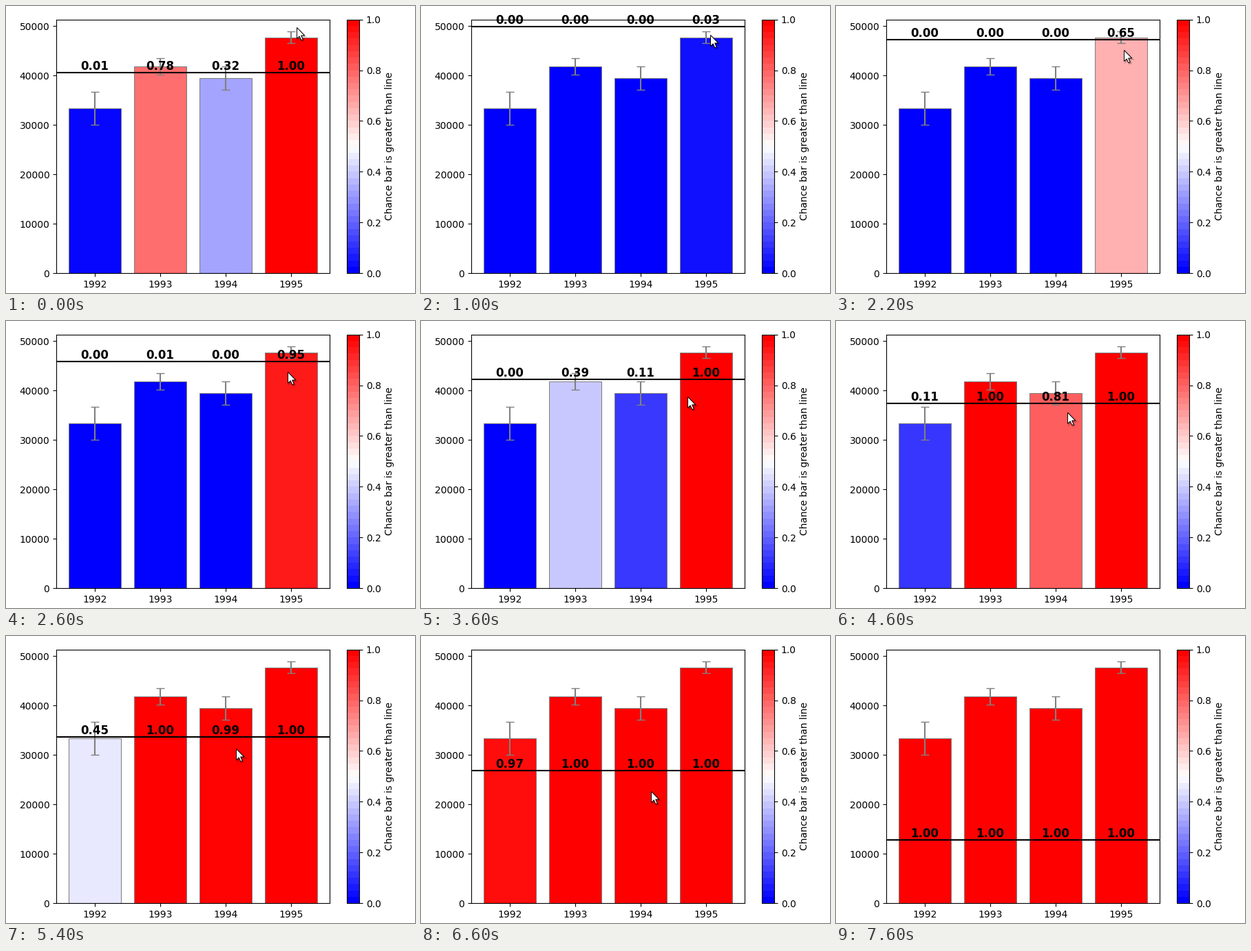
A matplotlib script for the animation above (8400 ms loop, 594x418 px).

```python
import math

import numpy as np
import matplotlib.pyplot as plt
from matplotlib.animation import FuncAnimation
from matplotlib.cm import ScalarMappable
from matplotlib.colors import Normalize
from matplotlib.patches import Polygon

W, H, DPI = 594, 418, 100
LEFT, BOTTOM, WIDTH, HEIGHT = 73, 28.8, 396.8, 369.6
STEP, FRAMES = 200, 42       # ms per step, steps per loop
PAUSES = (10, 17, 22, 28)    # steps in which the pointer rests
EXIT = 7600                  # ms at which the pointer has left
LAG = 600                    # ms by which the line trails the pointer

# Yearly samples, reduced to mean and standard error
np.random.seed(12345)
YEARS = ["1992", "1993", "1994", "1995"]
SPREAD = [(32000, 200000), (43000, 100000), (43500, 140000), (48000, 70000)]
samples = [np.random.normal(mu, sd, 3650) for mu, sd in SPREAD]
means = np.array([s.mean() for s in samples])
errors = np.array([s.std(ddof=1) / math.sqrt(len(s)) for s in samples])
top = 1.05 * (means + errors).max()

# Pointer path as (ms, pixel) points, measured from the top left
PATH_X = [(0, 422), (2200, 418), (3600, 387), (4600, 336), (5400, 334)]
PATH_Y = [(-600, 97.1), (0, 31), (600, 30), (1200, 47.5), (1600, 48.8),
          (2200, 64), (3000, 84.6), (3600, 110), (4000, 119.8), (4600, 133),
          (4800, 146.6), (5400, 164), (6000, 196), (6600, 226), (7000, 297),
          (7400, 384)]
ARROW = np.array([(0.5, 0.5), (0.5, 16.5), (4.2, 13), (6.8, 18.8),
                  (9.2, 17.8), (6.7, 12), (11.7, 12)])


def along(path, t):
    return np.interp(t, *zip(*path))


def to_value(y):
    """Chart value at a pixel row."""
    return (H - BOTTOM - y) / HEIGHT * top


def chance(mean, err, value):
    """Probability that the true mean lies above value."""
    return 0.5 * (1 + math.erf((mean - value) / (err * math.sqrt(2))))


def place(left, bottom, width, height):
    return fig.add_axes([left / W, bottom / H, width / W, height / H])


fig = plt.figure(figsize=(W / DPI, H / DPI), dpi=DPI, facecolor="white")
cmap = plt.get_cmap("bwr")

ax = place(LEFT, BOTTOM, WIDTH, HEIGHT)
pos = np.arange(len(YEARS))
bars = ax.bar(pos, means, 0.8, yerr=errors, edgecolor="gray", lw=0.75,
              ecolor="gray", capsize=4.4)
ax.set_xticks(pos, YEARS)
ax.set_xlim(-0.59, 3.59)
ax.set_ylim(0, top)
line = ax.axhline(0, color="black", lw=1.5)
labels = [ax.text(x, 0, "", ha="center", va="bottom", fontsize=12,
                  fontweight="bold") for x in pos]

cax = place(494.6, BOTTOM, HEIGHT / 20, HEIGHT)
scale = ScalarMappable(Normalize(0, 1), cmap.resampled(40))
fig.colorbar(scale, cax=cax, label="Chance bar is greater than line")

# Pixel overlay for the pointer
stage = place(0, 0, W, H)
stage.set_xlim(0, W)
stage.set_ylim(H, 0)
stage.axis("off")
shadow = [stage.add_patch(Polygon(ARROW, fc="black", ec="black", lw=w,
                                  alpha=0.1)) for w in (0.5, 2)]
arrow = stage.add_patch(Polygon(ARROW, fc="white", ec="black", lw=0.7))


def update(n):
    if n in PAUSES:
        n -= 1
    t = min(n * STEP, EXIT)

    value = to_value(along(PATH_Y, t - LAG))
    line.set_ydata([value, value])
    for bar, label, mean, err in zip(bars, labels, means, errors):
        p = chance(mean, err, value)
        bar.set_facecolor(cmap(p))
        label.set_text(f"{p:.2f}")
        label.set_y(value)

    tip = np.round([along(PATH_X, t), along(PATH_Y, t)])
    arrow.set_xy(ARROW + tip)
    for s in shadow:
        s.set_xy(ARROW + tip + 1.5)
    for part in (arrow, *shadow):
        part.set_visible(t < EXIT)
    return [line, arrow, *shadow, *labels, *bars]


anim = FuncAnimation(fig, update, frames=FRAMES, interval=STEP,
                     repeat=True, repeat_delay=0, blit=False)
plt.show()
```
